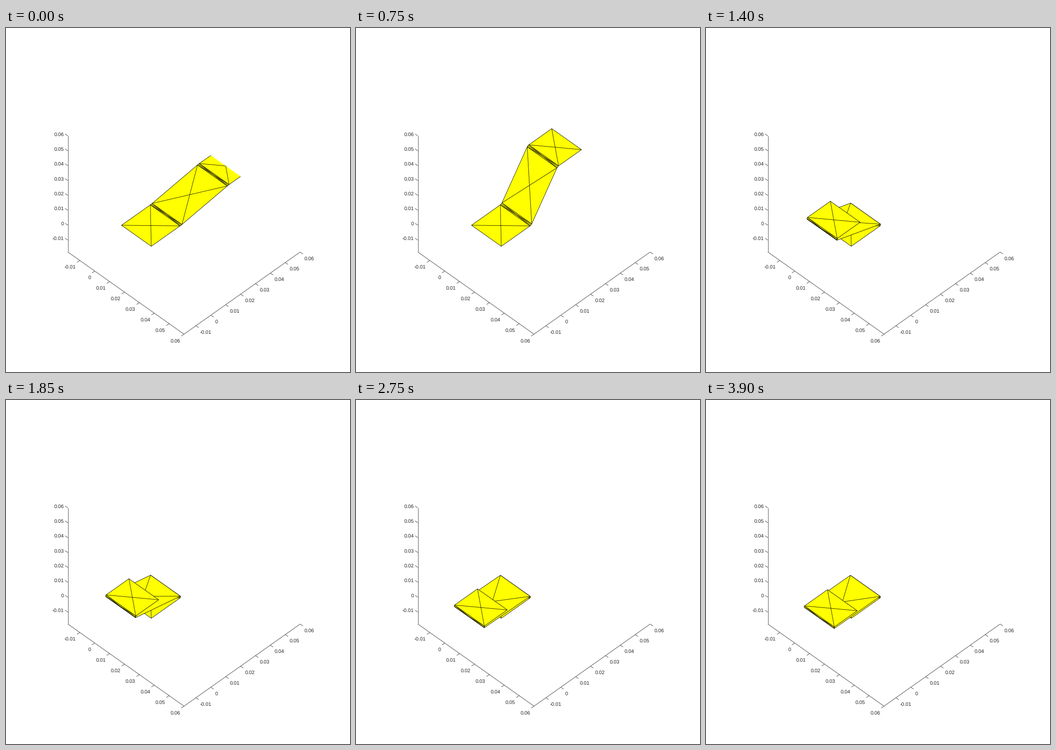
Recreate the animation shown at these times as a matplotlib script. Size 748 px wide and 748 px high, loop 3.95 s.

```python
import numpy as np
import matplotlib.pyplot as plt
from matplotlib.animation import FuncAnimation
from matplotlib.collections import LineCollection, PolyCollection
from matplotlib.patches import Polygon

plt.rcParams["text.hinting"] = "none"
plt.rcParams["text.hinting_factor"] = 1

SIZE, DPI = 748, 100
PX = 72 / DPI                 # one pixel in points
INTERVAL, FRAMES, HOLD = 50, 79, 10

# Lengths are in units of 0.01; the view is orthographic at azimuth 45, elevation 45.
# The cube of the axes fills 0.815 of the height, centred on the plot area.
LO, HI = -1.8, 6.0
CENTER = np.array([0.5175, 0.4825]) * SIZE
UNIT = 0.815 * SIZE / (1 + np.sqrt(2)) / (HI - LO)
WIDTH, CREASE = 2.0, 0.12
PANELS = (1.94, 3.08, 1.54)
AXIS_COLOR = "#262626"
LINE = 0.8 * PX


def project(p):
    x, y, z = np.moveaxis(np.asarray(p, float) - (LO + HI) / 2, -1, 0)
    flat = np.stack([x + y, (x - y) * np.sqrt(0.5) - z], axis=-1)
    return CENTER + UNIT * flat


def fold_angle(step):
    """Fold in degrees: steady folding, a slower press, then soft contact."""
    if step < 20:
        return 8.07 * (step + 1)
    free, stop = 161.4 + 0.65 * (step - 19), 179.7
    return (free + stop - np.hypot(free - stop, 1.0)) / 2


def profile(angle):
    """Side view (y, z) of the strip: panel, crease, panel, crease, panel."""
    a = np.radians(angle)
    half = CREASE / 2
    lengths = np.array([PANELS[0], half, half, PANELS[1], half, half, PANELS[2]])
    turns = a * np.array([0, 1 / 3, 2 / 3, 1, 2 / 3, 1 / 3, 0])
    steps = lengths[:, None] * np.column_stack([np.cos(turns), np.sin(turns)])
    return np.vstack([[0, 0], np.cumsum(steps, axis=0)])


def quad(a, b):
    """Rectangle across the strip between two profile points."""
    return np.array([(0, *a), (WIDTH, *a), (WIDTH, *b), (0, *b)])


def outline(q):
    return [q[[i, (i + 1) % 4]] for i in range(4)]


def panel(a, b):
    """Faces and edges of a panel: a rectangle with both diagonals."""
    q = quad(a, b)
    return [q], outline(q) + [q[[0, 2]], q[[1, 3]]]


def crease(a, c, b):
    """Faces and edges of a crease: two strips with spokes to the middle."""
    first, second, whole = quad(a, c), quad(c, b), quad(a, b)
    mid = np.array([WIDTH / 2, *c])
    edges = outline(first) + outline(second)[1:]
    return [first, second], edges + [np.array([p, mid]) for p in whole]


def draw_axes(ax):
    near, far = (LO, LO, LO), (HI, LO, LO)
    lines = [project([near, (LO, LO, HI)]),
             project([near, far]),
             project([far, (HI, HI, LO)])]
    # point on the axis, tick direction, label offset, alignment
    rules = [
        (lambda v: (LO, LO, v), (-6, -4.2), (-8.5, -4), "right"),
        (lambda v: (v, LO, LO), (-6, 4.2), (-8.5, 14), "right"),
        (lambda v: (HI, v, LO), (6, 4.2), (9, 13.5), "left"),
    ]
    for place, tick, shift, align in rules:
        for v in range(-1, 7):
            p = project(place(v))
            lines.append(np.array([p, p + tick]))
            x, y = p + shift
            ax.text(x, y + 3.8, f"{v / 100:g}", ha=align, va="baseline",
                    fontsize=10.67 * PX, family="Liberation Sans",
                    color=AXIS_COLOR)
    ax.add_collection(LineCollection(lines, colors=AXIS_COLOR, linewidths=LINE))


fig = plt.figure(figsize=(SIZE / DPI, SIZE / DPI), dpi=DPI, facecolor="white")
ax = fig.add_axes([0, 0, 1, 1])
ax.set(xlim=(0, SIZE), ylim=(SIZE, 0))
ax.axis("off")
draw_axes(ax)


def add_part(z):
    fill = PolyCollection([], facecolors="yellow", edgecolors="none", zorder=z)
    wire = LineCollection([], colors="black", linewidths=LINE, zorder=z + 0.5)
    for artist in (fill, wire):
        ax.add_collection(artist, autolim=False)
    return fill, wire


# Stacked from the fixed panel up to the moving end panel.
parts = [add_part(5 + k) for k in range(5)]


def update(i):
    p = profile(fold_angle(max(0, i - HOLD + 1)))
    shapes = [panel(p[0], p[1]), crease(p[1], p[2], p[3]),
              panel(p[3], p[4]), crease(p[4], p[5], p[6]),
              panel(p[6], p[7])]
    for (fill, wire), (faces, edges) in zip(parts, shapes):
        fill.set_verts(list(project(faces)))
        wire.set_segments(list(project(edges)))
    # The end panel is cut off where it leaves the axis range in y.
    z = p[7][1]
    inside = project([(-9, -9, z), (9, -9, z), (9, HI, z), (-9, HI, z)])
    for artist in parts[-1]:
        artist.set_clip_path(Polygon(inside, transform=ax.transData))
    return [artist for part in parts for artist in part]


anim = FuncAnimation(fig, update, frames=FRAMES, interval=INTERVAL,
                     repeat=True, repeat_delay=0, blit=False)
plt.show()
```
